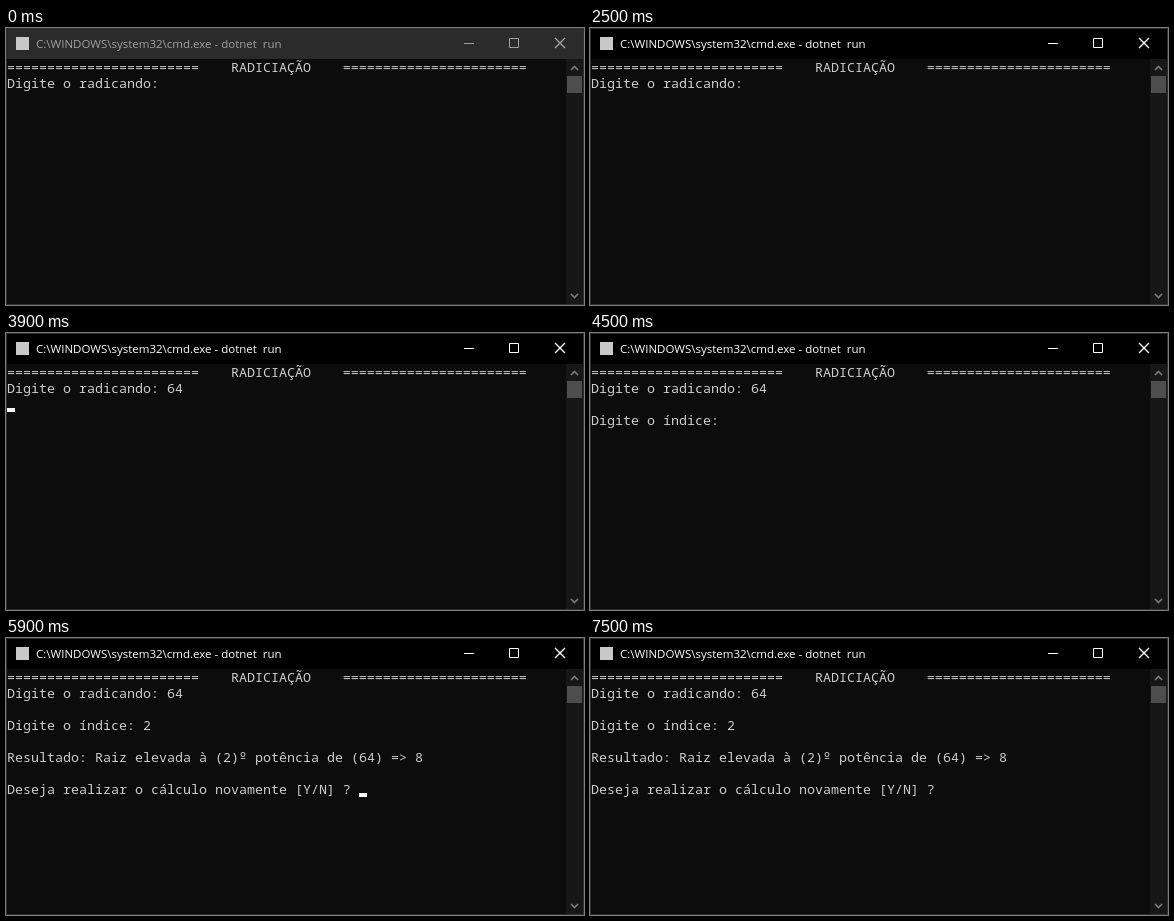
An HTML page that plays this animation: 578x277 px, repeating every 8 s.

```html
<!DOCTYPE html>
<html lang="pt">
<head>
<meta charset="utf-8">
<title>Radiciação</title>
<style>
  html, body { margin: 0; width: 100%; height: 100%; overflow: hidden; background: #0c0c0c; }
  svg { display: block; width: 100vw; height: 100vh; }
  text { white-space: pre; }
  #rows { font: 13.333px "Noto Sans Mono", "DejaVu Sans Mono", monospace; fill: #ccc; font-variant-ligatures: none; }
  .ordinal { font-family: "DejaVu Sans Mono", monospace; }
  #title { font: 500 11.5px "Open Sans", "Noto Sans", sans-serif; }
</style>
</head>
<body>
<svg viewBox="0 0 578 277" xmlns="http://www.w3.org/2000/svg">
  <rect width="578" height="277" fill="#0c0c0c"/>
  <rect id="bar" x="1" y="1" width="576" height="30"/>
  <rect x="10" y="9" width="13" height="13" fill="#c8c8c8"/>
  <text id="title" x="30" y="20">C:\WINDOWS\system32\cmd.exe - dotnet  run</text>
  <g id="buttons" fill="none">
    <path d="M458 15.5h10M503.5 10.5h9v9h-9z"/>
    <path d="M549 10l10 10M559 10l-10 10" stroke-width="1.4"/>
  </g>
  <rect x="560" y="31" width="17" height="245" fill="#171717"/>
  <rect x="561" y="48" width="15" height="17" fill="#4d4d4d"/>
  <path d="M565 42l3.5 -3.5l3.5 3.5M565 266l3.5 3.5l3.5 -3.5" fill="none" stroke="#7a7a7a" stroke-width="1.7"/>
  <g id="rows"></g>
  <rect id="cursor" width="8" height="4" fill="#fff"/>
  <rect x=".5" y=".5" width="577" height="276" fill="none" stroke="#2e2e2e"/>
</svg>
<script>
const LOOP = 8000, CELL = 8, LINE = 16, LEFT = 1, TOP = 31;
const $ = id => document.getElementById(id);

const header = "=".repeat(24) + "    RADICIAÇÃO    " + "=".repeat(23);
const askBase = "Digite o radicando: ";
const askIndex = "Digite o índice: ";
const result = "Resultado: Raiz elevada à (2)º potência de (64) => 8";
const again = "Deseja realizar o cálculo novamente [Y/N] ? ";

const rows = Array.from({ length: 8 }, (_, i) => {
  const row = document.createElementNS("http://www.w3.org/2000/svg", "text");
  row.setAttribute("x", LEFT);
  row.setAttribute("y", TOP + i * LINE + 13);
  return $("rows").appendChild(row);
});

function screen(t) {
  const lines = [header, askBase + (t < 2900 ? "" : t < 3100 ? "6" : "64")];
  if (t >= 3900) lines.push("");
  if (t >= 4000) lines.push(askIndex + (t < 5000 ? "" : "2"));
  if (t >= 5900) lines.push("", result, "", again);
  return lines;
}

// Half-second blink; printing output shows the cursor and restarts the blink.
function cursorOn(t) {
  if (t < 2000) return false;
  if (t < 3900) return Math.floor(t / 500) % 2 === 0;
  if (t < 5900) return t < 4500 || t >= 5500;
  return t < 6500 || Math.floor(t / 500) % 2 === 0;
}

function draw(t) {
  const active = t >= 1400, ink = active ? "#fff" : "#a0a0a0";
  $("bar").setAttribute("fill", active ? "#000" : "#2b2b2b");
  $("title").setAttribute("fill", ink);
  $("buttons").setAttribute("stroke", ink);

  const lines = screen(t), last = lines.length - 1;
  rows.forEach((row, i) => {
    const s = lines[i] || "";
    // The underlined ordinal sign needs its own font.
    if (row.textContent !== s) row.innerHTML = s.replace("º", '<tspan class="ordinal">º</tspan>');
  });
  const cursor = $("cursor");
  cursor.setAttribute("x", LEFT + lines[last].length * CELL);
  cursor.setAttribute("y", TOP + last * LINE + 12);
  cursor.setAttribute("visibility", cursorOn(t) ? "visible" : "hidden");
}

const start = performance.now();
function tick() {
  draw((performance.now() - start) % LOOP);
  requestAnimationFrame(tick);
}
tick();
</script>
</body>
</html>
```
